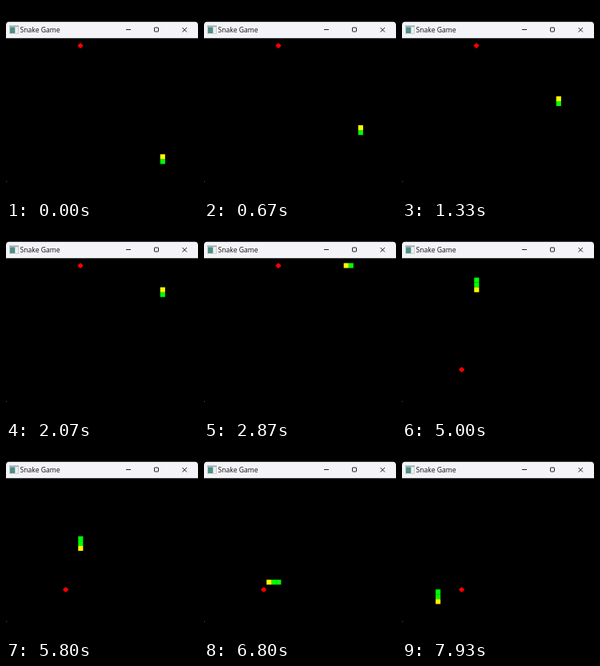
An HTML page for the animation above (8 s loop, 240 px wide and 240 px high).

```html
<!DOCTYPE html>
<html lang="en">
<head>
<meta charset="utf-8">
<title>Snake Game</title>
<style>
  html, body { margin: 0; width: 100%; height: 100%; overflow: hidden; background: #000; }
  svg { display: block; width: 100vw; height: 100vh; }
  text { font: 8.6px "Open Sans", "Noto Sans", sans-serif; fill: #111; }
  .controls { fill: none; stroke: #222; stroke-width: 1; }
</style>
</head>
<body>
<svg viewBox="0 0 240 240">
  <rect width="240" height="240"/>
  <path d="M0 40.3V24Q0 19.7 4 19.7H236Q240 19.7 240 24V40.3Z" fill="#f3f3f8"/>

  <g>
    <rect x="4" y="24.5" width="12" height="10.5" fill="#c9d3d3"/>
    <rect x="5" y="26.5" width="6" height="7.5" fill="#4f8f86"/>
    <rect x="12" y="26.5" width="3" height="7.5" fill="#eef1ee"/>
    <rect x="4" y="24.5" width="12" height="1.3" fill="#9aa9b4"/>
  </g>
  <text x="17.6" y="33">Snake Game</text>

  <g class="controls">
    <path d="M150 29.5H156"/>
    <rect x="185.5" y="27" width="5" height="5" rx=".6"/>
    <path d="M220.5 27L226 32.5M226 27L220.5 32.5"/>
  </g>

  <rect y="219" width="1" height="1" fill="#555"/>

  <g id="apple" fill="#f00">
    <circle r="2.6"/>
    <rect x="-3.2" y="-1" width="6.4" height="2"/>
    <rect x="-1" y="-3" width="2" height="6"/>
  </g>
  <g id="snake"></g>
</svg>
<script>
const LOOP = 8000, STEP = 109.4, LEAD = 2;
const EAT_STEP = 40;
const CELL_X = 6.03, CELL_Y = 6.04, LEFT = 42, TOP = 46.4;

// Each run: column step, row step, number of cells.
const runs = [[0, -1, 23], [-1, 0, 17], [0, 1, 20], [-1, 0, 8], [0, 1, 4]];
const path = [[25, 24], [25, 23]];
for (const [dx, dy, count] of runs) {
  for (let i = 0; i < count; i++) {
    const [col, row] = path[path.length - 1];
    path.push([col + dx, row + dy]);
  }
}

const snake = document.getElementById("snake");
const apple = document.getElementById("apple");

// Tail first, head last, so the head is painted on top.
const cells = ["#0f0", "#0f0", "#ff0"].map(color => {
  const rect = document.createElementNS("http://www.w3.org/2000/svg", "rect");
  rect.setAttribute("width", 6.1);
  rect.setAttribute("height", 6.1);
  rect.setAttribute("fill", color);
  return snake.appendChild(rect);
});

function draw(time) {
  const step = Math.min(Math.floor((time % LOOP + LEAD) / STEP), path.length - 2);
  const eaten = step >= EAT_STEP;
  cells.forEach((rect, i) => {
    const [col, row] = path[Math.max(step - 1 + i, 0)];
    rect.setAttribute("x", LEFT + col * CELL_X);
    rect.setAttribute("y", TOP + row * CELL_Y);
  });
  cells[0].setAttribute("visibility", eaten ? "visible" : "hidden");
  apple.setAttribute("transform", eaten ? "translate(74.6 179.5)" : "translate(93 49.5)");
}

const start = performance.now();
function tick() {
  draw(performance.now() - start);
  requestAnimationFrame(tick);
}
tick();
</script>
</body>
</html>
```
